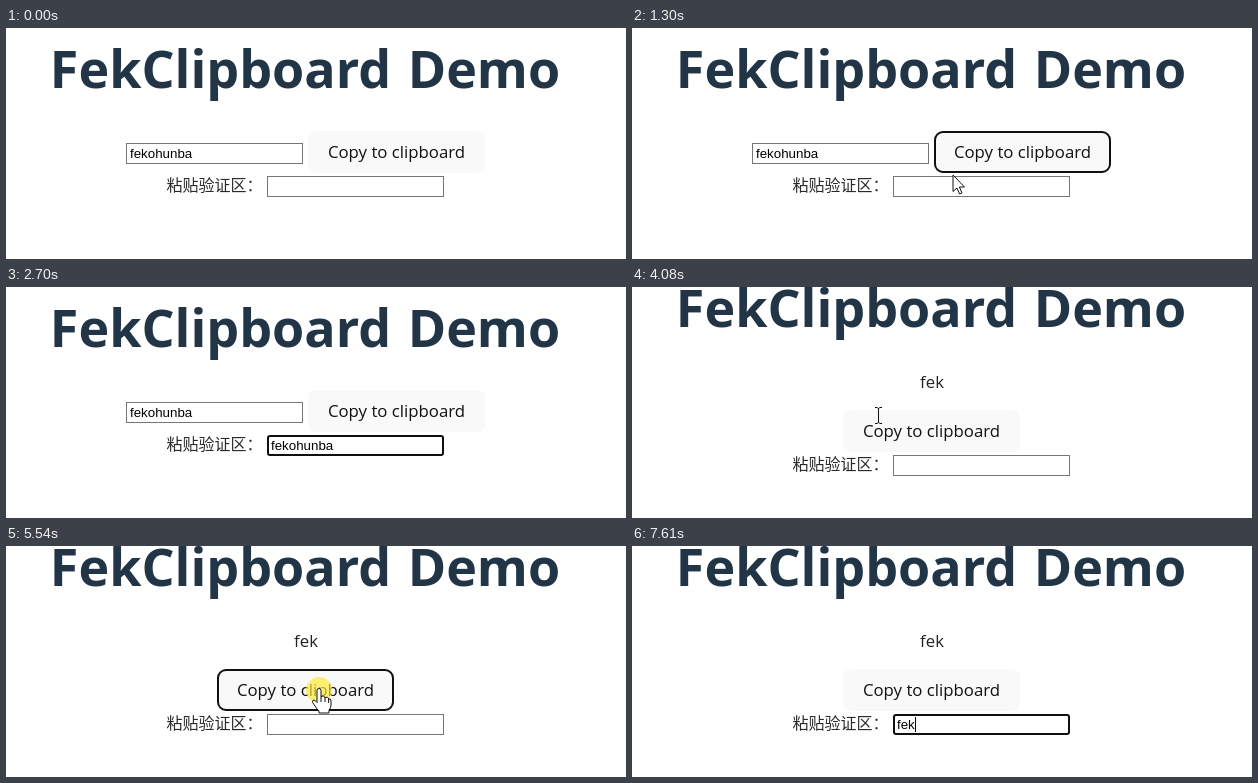
Animation of 620 by 231 pixels, one loop 8 s. Source, as an HTML page with a canvas:

```html
<!DOCTYPE html>
<html lang="en">
<head>
<meta charset="utf-8">
<title>Clipboard demo</title>
<style>
html, body { margin: 0; width: 100%; height: 100%; overflow: hidden; background: #fff; }
canvas { display: block; }
</style>
</head>
<body>
<canvas id="stage" width="620" height="231"></canvas>
<script>
const ctx = document.getElementById('stage').getContext('2d');
const LOOP = 8000;
const SCENE_TWO = 3870;
const LONG_TEXT = 'fekohunba';
const SHORT_TEXT = 'fek';
const SANS = '"Open Sans", "Noto Sans", sans-serif';
const FIELD = '13.333px "Liberation Sans", Arial, sans-serif';
const CJK = '16px "Noto Sans CJK SC", "Noto Sans CJK", sans-serif';

// Pointer keys: time, x, y, shape until the next key.
const pointerKeys = [
  [0, 352, 197, null],
  [110, 352, 197, 'arrow'],
  [330, 348, 144, 'hand'],
  [750, 342, 127, 'hand'],
  [1180, 342, 127, 'hand'],
  [1280, 325, 145, 'arrow'],
  [1320, 318, 149, 'beam'],
  [1480, 298, 156, 'beam'],
  [2000, 298, 159, 'beam'],
  [2180, 298, 159, 'beam'],
  [2340, 306, 169, 'arrow'],
  [2580, 318, 196, null],
  [3870, 250, 104, 'beam'],
  [4080, 246, 128, 'beam'],
  [4770, 246, 128, 'hand'],
  [5000, 284, 158, 'hand'],
  [5260, 313, 143, 'hand'],
  [6040, 313, 143, 'hand'],
  [6160, 306, 165, 'beam'],
  [6270, 300, 178, 'beam'],
  [7550, 300, 178, null],
  [LOOP, 300, 178, null]
];

const clicks = [[930, 1110], [1500, 1640], [5540, 5740], [6300, 6480]];

const arrow = new Path2D('M0 0V16.5L4 13L6.6 19L9 18L6.4 12H11.5Z');
const hand = new Path2D(
  'M-2 13V1.5Q-2 -.5 0 -.5Q2 -.5 2 1.5V8Q3 6.8 4.5 7.2Q6 7.5 6 9Q7 7.8 8.4 8.4' +
  'Q9.6 8.8 9.6 10Q12 9.2 12 12V16Q12 19 10 21V24H0V22Q-2 20 -4 17L-6.4 13.5' +
  'Q-6.8 11 -5 11Q-4 11 -2 13.5Z');
const fingers = new Path2D('M2 8V13M6 9V13M9.6 10V14');
const beam = new Path2D('M-3 -7.5H-1L.5 -6.5L2 -7.5H4M.5 -6.5V7.5M-3 8.5H-1L.5 7.5L2 8.5H4');

const within = (t, start, end) => t >= start && t < end;

function label(text, x, y, font, color, align = 'left') {
  ctx.font = font;
  ctx.fillStyle = color;
  ctx.textAlign = align;
  ctx.fillText(text, x, y);
}

function title(baseline) {
  const name = SHORT_TEXT[0].toUpperCase() + SHORT_TEXT.slice(1);
  ctx.wordSpacing = '3px';
  label(name + 'Clipboard Demo', 299, baseline, 'bold 52px ' + SANS, '#213547', 'center');
  ctx.wordSpacing = '0px';
}

function roundedBox(x, y, w, h, radius) {
  ctx.beginPath();
  ctx.roundRect(x, y, w, h, radius);
}

function ring(x, y, w, h, radius) {
  roundedBox(x + 1, y + 1, w - 2, h - 2, radius);
  ctx.strokeStyle = '#101010';
  ctx.lineWidth = 2;
  ctx.stroke();
}

function input(x, y, text, focused, caret) {
  if (focused) {
    ring(x, y, 177, 21, 2);
  } else {
    ctx.strokeStyle = '#767676';
    ctx.lineWidth = 1;
    ctx.strokeRect(x + .5, y + .5, 176, 20);
  }
  label(text, x + 4, y + 15, FIELD, '#000');
  if (caret) {
    ctx.fillRect(x + 4 + Math.round(ctx.measureText(text).width), y + 3, 1, 15);
  }
}

function button(x, y, hovered, focused) {
  roundedBox(x, y, 177, 42, 8);
  ctx.fillStyle = '#f9f9f9';
  ctx.fill();
  if (focused) {
    ring(x, y, 177, 42, 8);
  } else if (hovered) {
    roundedBox(x + .5, y + .5, 176, 41, 7.5);
    ctx.strokeStyle = '#5b7df0';
    ctx.lineWidth = 1;
    ctx.stroke();
  }
  label('Copy to clipboard', x + 88.5, y + 27, '16.8px ' + SANS, '#111', 'center');
}

function pointerAt(t) {
  const i = pointerKeys.findIndex((key, n) => n > 0 && t < key[0]) - 1;
  const [t0, x0, y0, shape] = pointerKeys[i];
  const [t1, x1, y1] = pointerKeys[i + 1];
  const p = (t - t0) / (t1 - t0);
  return { x: x0 + (x1 - x0) * p, y: y0 + (y1 - y0) * p, shape };
}

function drawPointer({ x, y, shape }) {
  if (!shape) return;
  ctx.save();
  ctx.translate(Math.round(x), Math.round(y));
  ctx.strokeStyle = '#111';
  ctx.lineWidth = 1;
  if (shape === 'beam') {
    ctx.stroke(beam);
  } else {
    const outline = shape === 'hand' ? hand : arrow;
    ctx.fillStyle = '#fff';
    ctx.fill(outline);
    ctx.stroke(outline);
    if (shape === 'hand') ctx.stroke(fingers);
  }
  ctx.restore();
}

function drawClick(t, { x, y }) {
  if (!clicks.some(([start, end]) => within(t, start, end))) return;
  ctx.beginPath();
  ctx.arc(Math.round(x), Math.round(y) + 1, 13, 0, Math.PI * 2);
  ctx.fillStyle = 'rgba(255, 232, 50, .68)';
  ctx.fill();
}

function draw(t) {
  const second = t >= SCENE_TWO;
  const shift = second ? 20 : 0;
  const pointer = pointerAt(t);
  const hovered = pointer.shape === 'hand';

  ctx.fillStyle = '#fff';
  ctx.fillRect(0, 0, 620, 231);
  title(60 - shift);

  if (second) {
    label(SHORT_TEXT, 300, 101, '16.8px ' + SANS, '#222', 'center');
    button(211, 123, hovered, within(t, 5500, 6300));
  } else {
    input(120, 115, LONG_TEXT, false, false);
    button(302, 103, hovered, within(t, 930, 1500));
  }

  const focused = second ? t >= 6300 : within(t, 1500, 3240);
  const caret = focused && (second
    ? !within(t, 6990, 7550)
    : !within(t, 2470, 2970));
  const pasted = second ? t >= 6500 : t >= 1860;
  const text = pasted ? (second ? SHORT_TEXT : LONG_TEXT) : '';
  label('粘贴验证区：', 160.4, 163 + shift, CJK, '#2a2a2a');
  input(261, 148 + shift, text, focused, caret);

  drawClick(t, pointer);
  drawPointer(pointer);
}

function tick() {
  draw(performance.now() % LOOP);
  requestAnimationFrame(tick);
}
tick();
</script>
</body>
</html>
```
